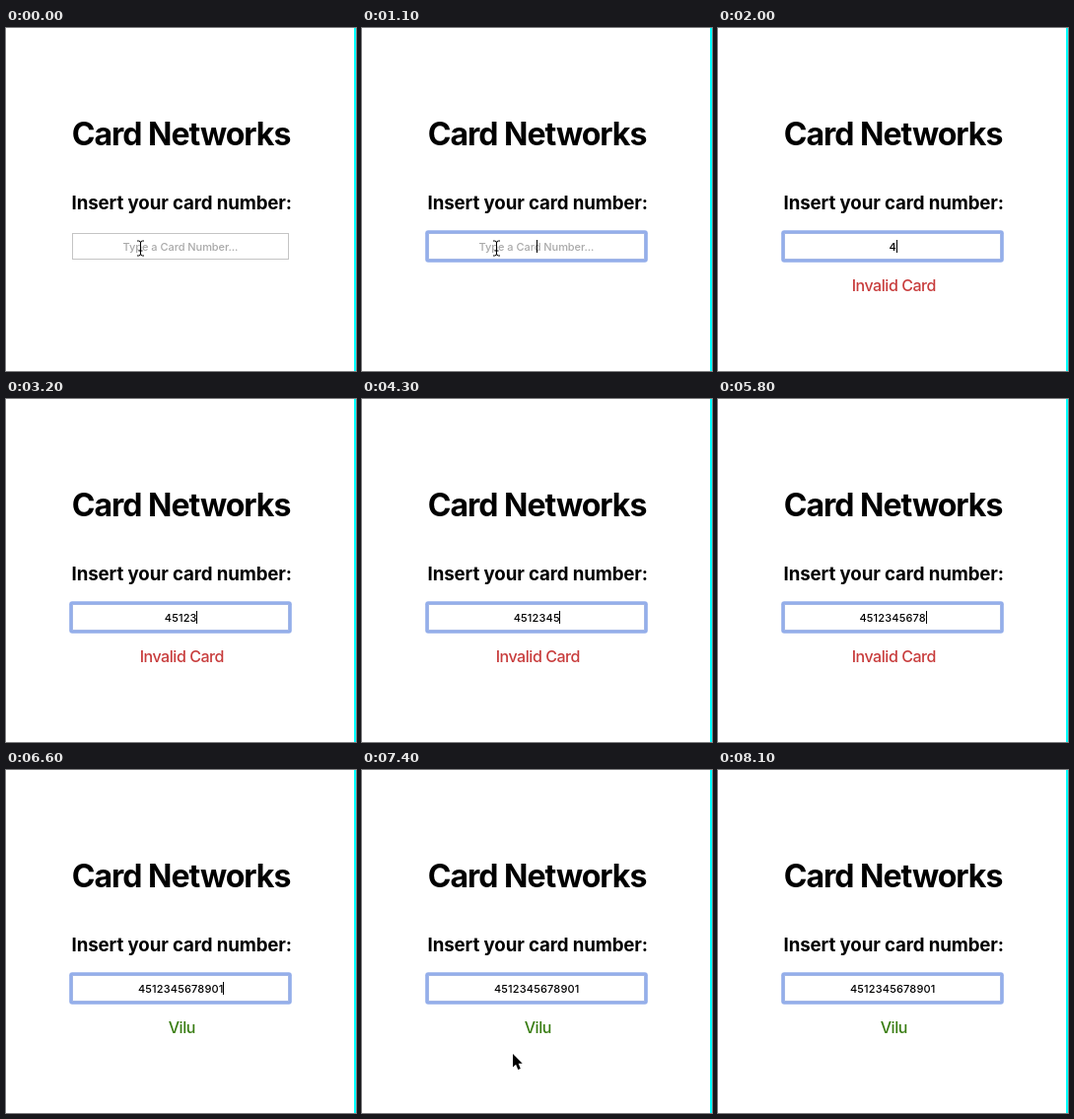
Animation, 355 px wide and 348 px high, one loop 8200 ms. Source, as an HTML page:

```html
<!DOCTYPE html>
<html lang="en">
<head>
<meta charset="utf-8">
<title>Card Networks</title>
<style>
  html, body { margin: 0; width: 100%; height: 100%; overflow: hidden; background: #fff; }
  svg { display: block; width: 355px; height: 348px; }
  text { font-family: Inter, "Liberation Sans", sans-serif; text-anchor: middle; }
  .title { font-size: 32px; font-weight: 700; letter-spacing: -1px; }
  .label { font-size: 18.7px; font-weight: 700; letter-spacing: -.12px; }
  .entry { font-size: 11px; }
  .hint { font-weight: 500; letter-spacing: -.05px; fill: #a9a9a9; }
  .digits { font-weight: 500; letter-spacing: .15px; }
  .result { font-size: 16px; font-weight: 500; letter-spacing: -.45px; }
</style>
</head>
<body>
<svg viewBox="0 0 355 348">
  <rect x="353" width="2" height="348" fill="#0ff"/>
  <text class="title" x="177.6" y="118.5">Card Networks</text>
  <text class="label" x="178.3" y="184.3">Insert your card number:</text>
  <rect id="ring" x="64.2" y="205.2" width="225.6" height="32.6" rx="3" fill="#94aeea"/>
  <rect id="field" x="67.5" y="208.5" width="219" height="26" fill="#fff"/>
  <text id="hint" class="entry hint" x="177" y="226">Type a Card Number...</text>
  <text id="digits" class="entry digits" x="177.2" y="226"></text>
  <rect id="caret" y="215" width="1" height="13"/>
  <text id="result" class="result" x="178.3" y="267"></text>
  <g id="beam" fill="none">
    <path id="beamLine" d="M-3.5-7.5H-2Q0-7.5 0-5.5V5.5Q0 7.5-2 7.5H-3.5M3.5-7.5H2Q0-7.5 0-5.5M0 5.5Q0 7.5 2 7.5H3.5M-2 2.5H2" stroke="#000"/>
  </g>
  <path id="arrow" d="M0 0V13.5L3.1 10.7L5.3 16L7.8 15L5.6 9.8H9.7Z" stroke="#fff" stroke-width="1.6" paint-order="stroke"/>
</svg>
<script>
const LOOP = 8200, FOCUS = 100;
const NUMBER = "4512345678901";
const KEYS = [2000, 2300, 2800, 3000, 3200, 3900, 4300, 4500, 5500, 5800, 5900, 6500, 6600];
const MOVE = 7100, LEAVE = 8100;
// Pointer positions, 100 ms apart
const PATH = [[136.5, 223.5], [139, 247], [145, 270], [153, 288], [163, 299],
              [172, 306], [181, 310], [189, 311], [197, 311], [201, 311]];

const $ = id => document.getElementById(id);
const show = (id, on) => $(id).setAttribute("visibility", on ? "visible" : "hidden");
const place = (id, [x, y]) => $(id).setAttribute("transform", `translate(${x} ${y})`);

function draw(t) {
  const focused = t >= FOCUS;
  const typed = KEYS.filter(k => k <= t).length;
  const valid = typed === NUMBER.length;
  const lastInput = typed ? KEYS[typed - 1] : FOCUS;

  show("ring", focused);
  $("field").setAttribute("stroke", focused ? "#a2b6e6" : "#c4c4c4");
  show("hint", !typed);
  $("digits").textContent = NUMBER.slice(0, typed);
  $("result").textContent = !typed ? "" : valid ? "Vilu" : "Invalid Card";
  $("result").setAttribute("fill", valid ? "#397d13" : "#c83c3c");

  const width = typed ? $("digits").getComputedTextLength() : 0;
  $("caret").setAttribute("x", Math.floor(177.4 + width / 2));
  show("caret", focused && (t - lastInput) % 1000 < 500);

  const moving = t >= MOVE && t < LEAVE;
  const step = moving ? Math.floor((t - MOVE) / 100) : 0;
  show("beam", !typed || moving && step === 0);
  show("arrow", moving && step > 0);
  place("beam", PATH[0]);
  place("arrow", PATH[step]);
}

function tick() {
  draw(performance.now() % LOOP);
  requestAnimationFrame(tick);
}
tick();
</script>
</body>
</html>
```
